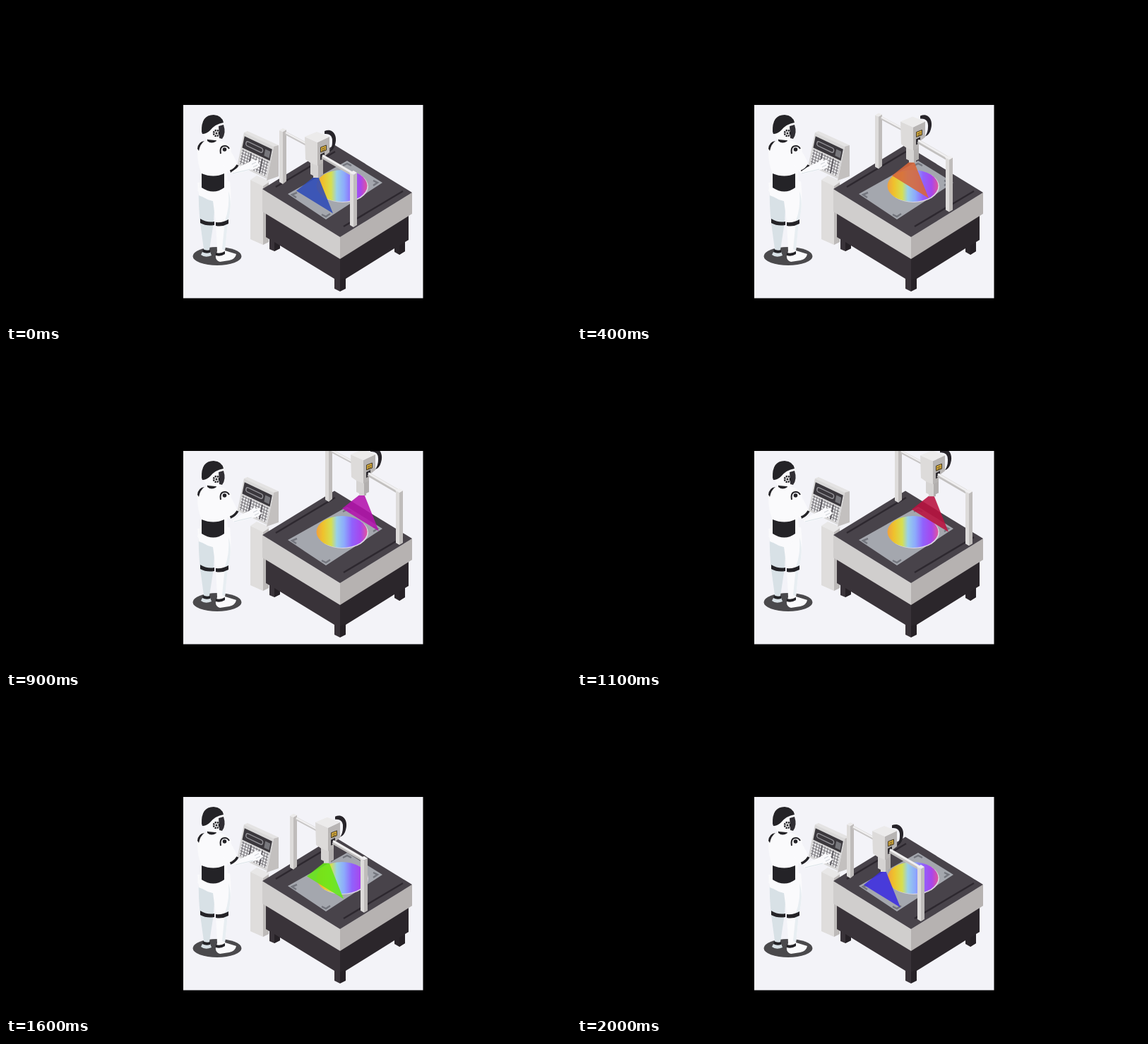
Write an HTML page that moves like this. It is 800 px wide and 450 px high and loops after 2100 ms.

```html
<!DOCTYPE html>
<html>
<head>
<meta charset="utf-8">
<style>
html, body { margin: 0; width: 100%; height: 100%; overflow: hidden; background: #000; }
svg { display: block; }
</style>
</head>
<body>
<svg width="800" height="450" viewBox="0 0 800 450">
  <defs>
    <clipPath id="panel"><path d="M251 140H590.500V413.500H251z"/></clipPath>
    <linearGradient id="rainbow">
      <stop offset="0" stop-color="#f0a040"/>
      <stop offset=".13" stop-color="#efc22c"/>
      <stop offset=".29" stop-color="#d6df50"/>
      <stop offset=".4" stop-color="#98d0e8"/>
      <stop offset=".55" stop-color="#8ca9fc"/>
      <stop offset=".7" stop-color="#9062fc"/>
      <stop offset=".87" stop-color="#a846ec"/>
      <stop offset="1" stop-color="#e0559c"/>
    </linearGradient>
    <pattern id="keys" width="9" height="9" patternUnits="userSpaceOnUse">
      <path d="M0 0H9V9H0z" fill="#77757a"/><path d="M1.500 1.500H8V8H1.500z" fill="#eeeef0"/>
    </pattern>
  </defs>
  <g clip-path="url(#panel)">
    <path d="M251 140H591V414H251z" fill="#f3f3f8"/>

    <!-- console -->
    <path d="M346 246L364 254V338L346 330z" fill="#dfdddc"/>
    <path d="M364 254L372 248V334L364 338z" fill="#bdbab9"/>
    <path d="M346 246L355 240L374 248L364 255z" fill="#e8e7e7"/>
    <path d="M337 179L342 177L386 197L379 200z" fill="#e4e3e3"/>
    <path d="M379 199L386 197V241L369 247z" fill="#c3c0bf"/>
    <g transform="matrix(.42 .2 -.09 .44 337 179)">
      <path d="M0 0H100V104H0z" fill="#d9d8d8"/>
      <path d="M4 10H97V47H4z" fill="#3b383d"/>
      <rect x="13" y="21" width="56" height="14" rx="6" fill="#3b383d" stroke="#96959a" stroke-width="3"/>
      <path d="M76 19H93V40H76z" fill="#77777c"/>
      <path d="M5 51H95V98H5z" fill="url(#keys)"/>
      <path d="M35 51V98M73 51V98" stroke="#5a585e" stroke-width="4"/>
    </g>

    <!-- table -->
    <path d="M368 292L473 354V390L465 386L388 339V343L380 347L373 344V330L368 327z" fill="#393339"/>
    <path d="M473 354L570 296V331L565 334V347L557 352L550 348V343L481 386V390H473z" fill="#2b262b"/>
    <path d="M380 334L388 339V343L380 347zM557 339L565 334V347L557 352z" fill="#262126"/>
    <path d="M465 384L473 388V404L465 400z" fill="#393339"/>
    <path d="M473 388L481 384V400L473 404z" fill="#262126"/>
    <path d="M363 259L473 327V358L363 291z" fill="#d0cecd"/>
    <path d="M473 327L575 264V294L473 358z" fill="#b6b2b1"/>
    <path d="M363 259L465 196.500L575 264L473 327z" fill="#48434a"/>
    <path d="M382 256L466 206M478 312L562 262" stroke="#2d282f" stroke-width="2.500"/>
    <path d="M399 266L483 219L533 250L453 302z" fill="#a4a7ae"/>
    <path d="M412 264L405 267L411 271M447 295L453 298L459 294M520 247L526 250L520 254M477 226L483 223L489 226"
      fill="none" stroke="#74767e" stroke-width="2.500"/>
    <ellipse cx="477" cy="255.500" rx="36" ry="22.500" fill="#ddd6e4"/>
    <ellipse cx="475.500" cy="254.500" rx="36" ry="22.500" fill="url(#rainbow)"/>

    <!-- gantry -->
    <g id="gantry">
      <path d="M387 176L392 178V252L387 249z" fill="#dddbda"/>
      <path d="M392 178L397 175V248L392 252z" fill="#bfbcbb"/>
      <path d="M387 176L392 173L397 175L392 178z" fill="#ecebeb"/>
      <path d="M396 180L426 196" stroke="#c6c4c4" stroke-width="4.500"/>
      <path d="M396 179L426 195" stroke="#f0eff0" stroke-width="2.500"/>
      <path id="beam" d="M437 241L411 261.500L463 293.500L442 241z"/>
      <path d="M451 177C463 172 470 184 466 196Q464 204 458 206Q462 200 462 193Q463 180 451 181z" fill="#27242a"/>
      <path d="M431 218H449V238L445 240V243H435V240L431 238z" fill="#d5d3d2"/>
      <path d="M442 218H449V238L445 240V243H442z" fill="#b2afae"/>
      <path d="M423 185L441 193V226L431 222L424 217z" fill="#dddbda"/>
      <path d="M441 193L458 185V207L449 214V222L441 226z" fill="#b8b5b4"/>
      <path d="M423 185L440 178L458 185L441 193z" fill="#ecebeb"/>
      <path d="M445.500 200L453.500 197V204L445.500 207z" fill="#d9ad3a" stroke="#403727"/>
      <path d="M447 202.500L452 200.500M447 205L452 203" stroke="#403727" stroke-width=".8"/>
      <path d="M445 210L451 207V215L445 218z" fill="#2b282e"/>
      <path d="M448 213L491 238" stroke="#c2c0bf" stroke-width="6"/>
      <path d="M448 211.500L491 236.500" stroke="#f0eff0" stroke-width="3"/>
      <path d="M487 236L492 239V313L487 310z" fill="#dddbda"/>
      <path d="M492 239L497 236V310L492 313z" fill="#bfbcbb"/>
      <path d="M486 236L492 233L497 236L492 239z" fill="#f0eff0"/>
    </g>

    <!-- robot -->
    <ellipse cx="299" cy="354" rx="34.500" ry="13" fill="#4a494c"/>
    <path d="M273 255L296 268L294 306L288 345L291 353Q282 357 276 352L280 344L275 307Q272 280 273 255z" fill="#d8e1e6"/>
    <path d="M271 250L317 248Q321 280 314 306L310 346L326 351Q325 358 316 360L303 362Q296 360 297 353L299 347L297 306L293 276L273 268z" fill="#fafafc"/>
    <path d="M315 262Q317 285 310 304L306 344L310 346L314 306Q321 280 315 262z" fill="#e8eef2"/>
    <path d="M275 301Q285 307 295 305V310Q284 312 275 307zM297 306Q307 307 315 302V308Q306 313 297 311zM279 344Q284 347 289 345V349Q283 351 278 348zM297 349Q304 351 310 347V351Q304 355 297 353z" fill="#242327"/>
    <path d="M271 200Q274 192 285 190H298Q312 191 319 202L313 238L315 258Q305 272 293 276Q279 274 271 261L277 238Q270 220 271 200z" fill="#fafafc"/>
    <path d="M277 237Q294 244 309 237V257Q294 268 277 257z" fill="#242327"/>
    <path d="M271 202Q272 192 281 191Q275 195 273 205z" fill="#242327"/>
    <path d="M285 188H298V191Q291 196 285 191z" fill="#242327"/>
    <path d="M277 176Q276 154 293 154Q307 155 309 168L310 181Q306 192 296 190L286 189Q281 186 280 181z" fill="#fafafc"/>
    <path d="M277 178Q276 154 294 154Q306 155 308 165Q296 167 289 176Q284 181 278 181z" fill="#242327"/>
    <path d="M301 170L308 168Q312 180 306 188L302 187z" fill="#302e34"/>
    <circle cx="298" cy="180" r="4" fill="#fff" stroke="#242327" stroke-width="2.500" stroke-dasharray="2.200 1"/>
    <circle cx="298" cy="180" r="1.500" fill="#242327"/>
    <path d="M302 204Q304 194 313 199Q322 209 328 225L324 235L316 236Q304 222 302 204z" fill="#fafafc"/>
    <path d="M304 209Q302 198 310 198Q314 198 316 202" fill="none" stroke="#242327" stroke-width="2"/>
    <circle cx="309.500" cy="203" r="2.800" fill="#242327"/>
    <path d="M317.500 234Q324 232 328 225" fill="none" stroke="#242327" stroke-width="3.500"/>
    <g id="arm">
      <path d="M319 235L329 228L344 221L350 216L352 219L358 217L357 222L360 225L355 230L346 232L327 237Q320 239 319 235z" fill="#fafafc"/>
      <path d="M321 237L346 231" stroke="#dce4e9" stroke-width="1.200"/>
      <path d="M348 224L354 221M350 228L356 225" stroke="#c9cdd3"/>
    </g>
  </g>
</svg>
<script>
const $ = id => document.getElementById(id);
const STEP = 100, LOOP = 2100;

// gantry travel along its rail, one value per step
const travel = [0, 8, 17, 26, 35, 40, 44, 53, 62, 65, 65, 63, 54, 44, 34, 25, 15, 5, -4, -8, -5];

// time, beam hue, saturation, lightness, hand x, hand y
const keys = [
  [0, 227, 60, 45, 0, 0],
  [400, 377, 68, 54, -3, 0],
  [700, 621, 80, 38, 2, 3],
  [1100, 704, 82, 40, 2, 3],
  [1300, 760, 70, 59, 4, -1],
  [1600, 817, 82, 50, 4, -1],
  [2000, 965, 75, 53, 2, 3],
  [2100, 947, 60, 45, 0, 0]
];

function pose(t) {
  const n = keys.findIndex(k => k[0] > t), a = keys[n - 1], b = keys[n];
  const f = (t - a[0]) / (b[0] - a[0]);
  return a.map((v, i) => v + (b[i] - v) * f);
}

function draw() {
  const step = Math.floor(performance.now() % LOOP / STEP);
  const x = travel[step];
  const [, h, s, l, hx, hy] = pose(step * STEP);
  $('gantry').setAttribute('transform', `translate(${x} ${-x * .615})`);
  $('beam').setAttribute('fill', `hsla(${h % 360}, ${s}%, ${l}%, .88)`);
  $('arm').setAttribute('transform', `translate(${hx} ${hy})`);
  requestAnimationFrame(draw);
}
draw();
</script>
</body>
</html>
```
